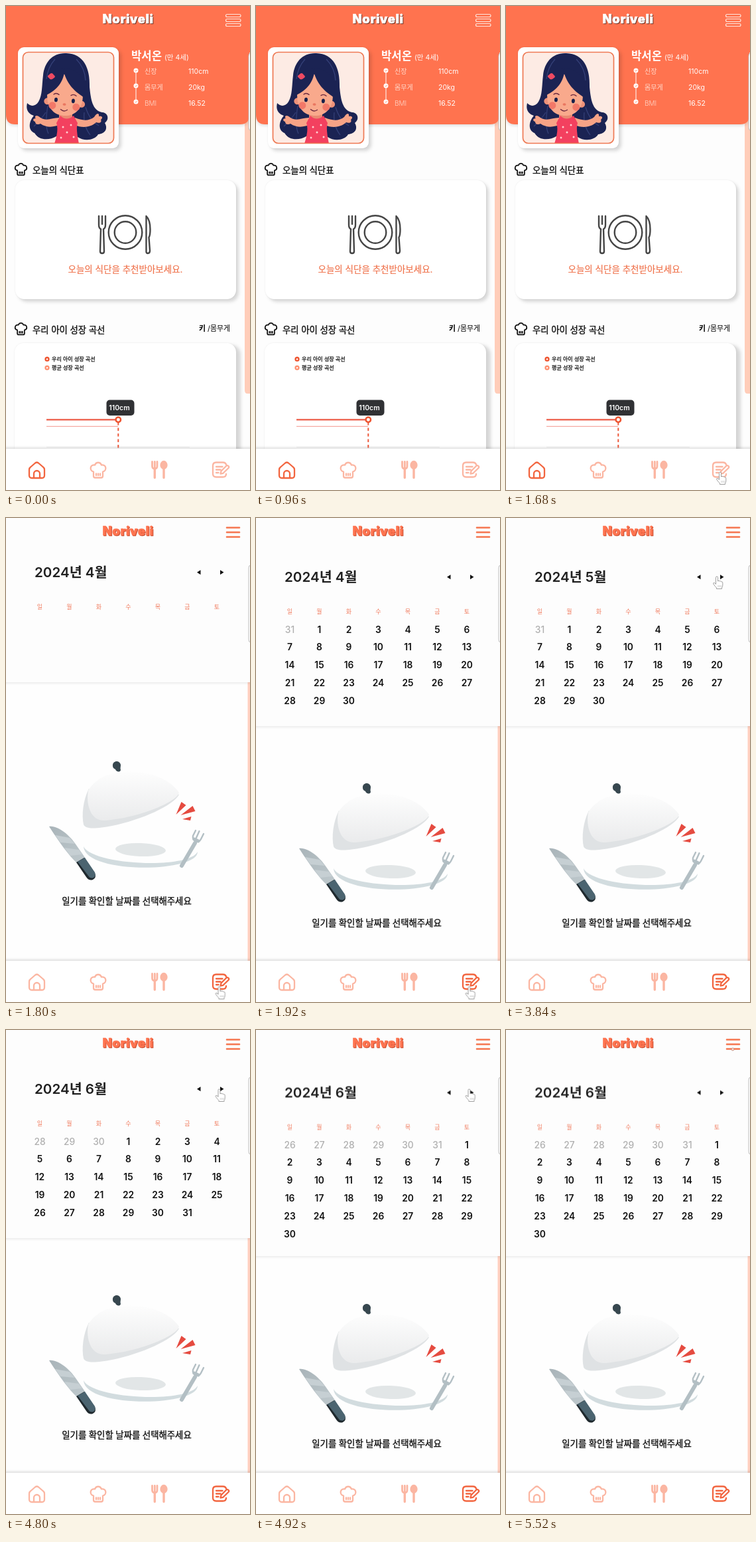
Recreate the animation shown at these times as an HTML page. Size 368 px wide and 728 px high, loop 5.64 s.

```html
<!DOCTYPE html>
<html lang="ko">
<head>
<meta charset="utf-8">
<title>Noriveli</title>
<style>
  html, body { margin: 0; width: 100%; height: 100%; overflow: hidden; background: #fdfdfd; }
  svg { display: block; }
  #stage { width: 368px; height: 728px; font-family: Inter, "Noto Sans CJK KR", "Noto Sans CJK", sans-serif; }
  .m { text-anchor: middle; }
  .title { font-size: 13.4px; }
  .medium { font-weight: 500; fill: #111; stroke: #111; stroke-width: .35; }
  .logo { font-size: 18.5px; font-weight: 900; letter-spacing: .5px; text-anchor: middle; stroke-width: .5; stroke-linejoin: round; }
  .row { font-size: 10.5px; fill: #fff; }
  .key { font-size: 10px; font-weight: 300; fill: #ffd9cc; }
  .legend { font-size: 8.05px; stroke-width: .25; }
  .month { font-size: 20.6px; font-weight: 600; fill: #202020; }
  .week { font-size: 9px; fill: #f07a5c; text-anchor: middle; }
  .day { font-size: 13.8px; font-weight: 600; text-anchor: middle; fill: #111; }
  .day.dim { fill: #b0b0b0; font-weight: 500; }
  .line { fill: none; stroke: currentColor; stroke-width: 2.3; stroke-linecap: round; stroke-linejoin: round; }
  .card { fill: #fff; filter: drop-shadow(4px 4px 2.5px rgba(0,0,0,.14)) drop-shadow(0 0 1px rgba(0,0,0,.08)); }
  .card.deep { filter: drop-shadow(7px 3px 2.5px rgba(0,0,0,.14)) drop-shadow(0 0 1px rgba(0,0,0,.08)); }
  .panel { fill: #fdfdfd; filter: drop-shadow(0 1px 2px rgba(0,0,0,.1)); }
  .bar { fill: #fff; filter: drop-shadow(0 -1px 2px rgba(0,0,0,.18)); }

  .a { animation: 5640ms step-end infinite; }
  #home { animation-name: home; }
  #diary { animation-name: diary; }
  #tabHome { animation-name: tabOff; }
  #tabDiary { animation-name: tabOn; }
  #head { animation-name: head; }
  #fold { animation-name: fold; }
  #art { animation-name: art; }
  #name4 { animation-name: name4; }
  #name5 { animation-name: name5; }
  #name6 { animation-name: name6; }
  #days4 { animation-name: days4; }
  #days5 { animation-name: days5; }
  #days6 { animation-name: days6; }
  #spot { animation-name: spot; }
  #hand { animation-name: hand; }

  @keyframes home { 0% { opacity: 1 } 31.915%, 100% { opacity: 0 } }
  @keyframes diary { 0% { opacity: 0 } 31.915%, 100% { opacity: 1 } }
  @keyframes tabOff { 0% { color: #f2653f } 31.915%, 100% { color: #fbb6a2 } }
  @keyframes tabOn { 0% { color: #fbb6a2 } 31.915%, 100% { color: #f2653f } }
  @keyframes head {
    0% { transform: translateY(-7px) } 34.043% { transform: none }
    87.234%, 100% { transform: translateY(5.5px) }
  }
  @keyframes fold {
    0% { transform: translateY(-66px) } 34.043% { transform: none }
    87.234%, 100% { transform: translateY(27px) }
  }
  @keyframes art {
    0% { transform: translateY(-33px) } 34.043% { transform: none }
    87.234%, 100% { transform: translateY(13px) }
  }
  @keyframes name4 { 0% { opacity: 1 } 68.085%, 100% { opacity: 0 } }
  @keyframes name5 { 0% { opacity: 0 } 68.085% { opacity: 1 } 85.106%, 100% { opacity: 0 } }
  @keyframes name6 { 0% { opacity: 0 } 85.106%, 100% { opacity: 1 } }
  @keyframes days4 { 0% { opacity: 0 } 34.043% { opacity: 1 } 70.213%, 100% { opacity: 0 } }
  @keyframes days5 { 0% { opacity: 0 } 70.213% { opacity: 1 } 87.234%, 100% { opacity: 0 } }
  @keyframes days6 { 0% { opacity: 0 } 87.234%, 100% { opacity: 1 } }
  @keyframes spot { 0% { opacity: 0 } 97.872%, 100% { opacity: 1 } }
  @keyframes hand {
    0% { transform: translate(-40px, -40px) }
    21.277% { transform: translate(357px, 716px) }
    23.404% { transform: translate(344px, 710px) }
    25.532% { transform: translate(332px, 705px) }
    27.66% { transform: translate(323px, 701px) }
    31.915% { transform: translate(321.5px, 705px) }
    36.17% { transform: translate(334px, 709px) }
    38.298% { transform: translate(351px, 714px) }
    40.426% { transform: translate(-40px, -40px) }
    61.702% { transform: translate(339px, 112px) }
    63.83% { transform: translate(328px, 99px) }
    65.957% { transform: translate(319px, 89px) }
    68.085% { transform: translate(318px, 88px) }
    72.34% { transform: translate(-40px, -40px) }
    82.979% { transform: translate(335px, 97px) }
    85.106% { transform: translate(321.5px, 89px) }
    89.362% { transform: translate(334px, 84px) }
    91.489%, 100% { transform: translate(-40px, -40px) }
  }
</style>
</head>
<body>
<svg id="stage" viewBox="0 0 368 728" width="368" height="728">
  <defs>
    <symbol id="hat" viewBox="0 0 26 26" overflow="visible">
      <path class="line" d="M6 15.5C-1 13.5 1 4 8 5.5C10 .5 16 .5 18 5.5C25 4 27 13.5 20 15.5V22Q20 24.5 17.5 24.5H8.5Q6 24.5 6 22ZM10 18.5v2.500M13 18.500v2.500M16 18.500v2.500"/>
    </symbol>
    <linearGradient id="dome" x1="0" y1="0" x2="0" y2="1">
      <stop offset="0" stop-color="#fdfdfd"/><stop offset="1" stop-color="#eaebec"/>
    </linearGradient>
    <linearGradient id="blade" x1="0" y1="0" x2="1" y2="1">
      <stop offset="0" stop-color="#a9b4b9"/><stop offset="1" stop-color="#bfc9cd"/>
    </linearGradient>
    <clipPath id="frame"><rect x="26" y="70" width="136" height="136" rx="7"/></clipPath>
  </defs>
  <rect width="368" height="728" fill="#fdfdfd"/>

  <g id="home" class="a">
    <path d="M360 160H368V583H364Q360 583 360 578Z" fill="#ffcdb9"/>
    <path d="M0 0H367V164Q367 178 353 178H14Q0 178 0 164Z" fill="#ff734f" style="filter:drop-shadow(0 2px 2px rgba(0,0,0,.12))"/>
    <path d="M366 0H368V70H366Z" fill="#ff734f"/>
    <text class="logo" x="185" y="27" fill="#6d3324" stroke="#6d3324">Noriveli</text>
    <text class="logo" x="184" y="26" fill="#fff" stroke="#fff">Noriveli</text>
    <g fill="#ff734f" stroke="#ffe3da" stroke-width="1.2">
      <rect x="331.5" y="12.5" width="22.5" height="4" rx="2"/>
      <rect x="331.5" y="19.5" width="22.5" height="4" rx="2"/>
      <rect x="331.5" y="26.5" width="22.5" height="4" rx="2"/>
    </g>

    <rect class="card" x="18" y="62" width="152" height="152" rx="9"/>
    <rect x="25.5" y="69.5" width="137" height="137" rx="8" fill="#fdebe4"/>
    <g clip-path="url(#frame)">
      <path d="M91 71C70 70 58 85 56 104C54 120 55 134 49 144C44 152 36 151 32 146C29 158 36 163 42 165C34 174 33 187 43 191C50 203 66 202 76 196L108 197C118 204 134 202 139 193C150 192 154 184 149 176C157 170 153 160 145 160C130 157 128 140 126 122C127 93 117 72 91 71Z" fill="#1b2353"/>
      <path d="M60 160Q52 172 42 181M120 152Q126 172 140 180M63 150Q58 180 64 192M118 160Q116 180 127 194M106 80Q119 93 120 112M74 80Q63 92 61 110" fill="none" stroke="#354179" stroke-width="1.2"/>
      <path d="M80 156H100V172H80Z" fill="#e98a72"/>
      <path d="M80 168C70 168 61 174 52 168C46 162 42 166 45 169C40 169 40 173 44 174C44 178 48 179 52 177C62 184 73 182 83 178ZM104 168C114 172 124 174 133 167C137 160 141 161 140 166C145 165 147 168 143 171C145 175 141 177 136 175C126 184 113 183 104 179Z" fill="#f7a386"/>
      <path d="M82 165Q91 174 102 165L108 176Q105 184 110 207H73Q80 186 76 176Z" fill="#f3405f"/>
      <g fill="#ffd0d2"><circle cx="86" cy="182" r="1.5"/><circle cx="98" cy="179" r="1.5"/><circle cx="92" cy="190" r="1.5"/><circle cx="83" cy="198" r="1.5"/><circle cx="102" cy="197" r="1.5"/></g>
      <g transform="translate(-3 4) rotate(4 92 130)">
        <circle cx="66" cy="141" r="5" fill="#ee927a"/><circle cx="118" cy="142" r="5" fill="#ee927a"/>
        <path d="M65 128C65 104 80 97 92 99C108 98 119 110 119 132C119 151 107 161 92 161C77 161 65 151 65 128Z" fill="#f9a98c"/>
        <path d="M89 90C89 111 79 123 64 132C60 108 68 88 89 90ZM86 90C93 114 106 123 120 131C124 106 112 88 86 90Z" fill="#1b2353"/>
        <g fill="#f27868"><circle cx="74" cy="147" r="5.5"/><circle cx="110" cy="147" r="5.5"/></g>
        <g fill="#18204a"><ellipse cx="79" cy="138" rx="2.5" ry="3.3"/><ellipse cx="105" cy="138" rx="2.5" ry="3.3"/></g>
        <path d="M75 130Q79 127 83 130M101 130Q105 127 109 130M87 152Q92 156 97 152" fill="none" stroke="#6d2b40" stroke-width="1.4" stroke-linecap="round"/>
        <ellipse cx="92" cy="144" rx="2.5" ry="1.8" fill="#e9765f"/>
        <path d="M66 101q4-5 7 0q4 2 0 5q-4 4-7 0q-4-2 0-5" fill="#ee4a62"/>
      </g>
    </g>
    <rect x="25.5" y="69.5" width="137" height="137" rx="8" fill="none" stroke="#ee7953" stroke-width="1.7"/>

    <g fill="#fff">
      <text x="189" y="81" font-size="16.7" font-weight="700">박서온</text>
      <text x="239" y="81" font-size="10.5">(만 4세)</text>
      <path d="M195.5 97h1v47h-1z"/>
      <circle cx="196" cy="97" r="3.5"/><circle cx="196" cy="120" r="3.5"/><circle cx="196" cy="144" r="3.5"/>
    </g>
    <path d="M194.5 97l1.2 1.2 2-2.2M194.5 120l1.2 1.2 2-2.2M194.5 144l1.2 1.2 2-2.2" fill="none" stroke="#ff734f" stroke-width=".8"/>
    <text class="key" x="209" y="102">신장</text><text class="row" x="275" y="102">110cm</text>
    <text class="key" x="209" y="126">몸무게</text><text class="row" x="275" y="126">20kg</text>
    <text class="key" x="209" y="150">BMI</text><text class="row" x="275" y="150">16.52</text>

    <use href="#hat" x="12.5" y="235.5" width="20" height="20" color="#111"/>
    <text class="title medium" x="40" y="252">오늘의 식단표</text>
    <rect class="card" x="14" y="262" width="333" height="179" rx="14"/>
    <g fill="none" stroke="#454545" stroke-width="2.4" stroke-linecap="round" stroke-linejoin="round">
      <circle cx="180" cy="340.5" r="25.3"/><circle cx="180" cy="340.5" r="16.3"/>
      <path d="M140 316V329Q140 334 143 335.5L142 369Q142 372 145 372T148 369L147 335.5Q150 334 150 329V316M145 316V328"/>
      <path d="M211.5 316Q217.5 322 217.5 336Q217.5 345 215.5 348L217 368Q217 372 214 372T211.5 368Z"/>
    </g>
    <text class="m" x="180" y="401" font-size="13.5" fill="#f0754f" stroke="#f0754f" stroke-width=".2">오늘의 식단을 추천받아보세요.</text>

    <use href="#hat" x="12.5" y="475.5" width="20" height="20" color="#111"/>
    <text class="title medium" x="40" y="492">우리 아이 성장 곡선</text>
    <text x="291" y="489" font-size="10.9"><tspan font-weight="700">키</tspan> /몸무게</text>
    <rect class="card deep" x="13" y="507" width="334" height="200" rx="14"/>
    <circle cx="62" cy="531.2" r="3.6" fill="#ee5430"/><circle cx="62" cy="544.2" r="3.6" fill="#ff8f70"/>
    <g fill="#fff"><circle cx="62" cy="531.2" r="1.2"/><circle cx="62" cy="544.2" r="1.2"/></g>
    <text class="legend medium" x="69" y="534">우리 아이 성장 곡선</text>
    <text class="legend medium" x="69" y="547">평균 성장 곡선</text>
    <path d="M61 663.5H277" stroke="#eee"/>
    <path d="M61 632.3H169" stroke="#f6aaa4" stroke-width="1.3"/>
    <path d="M61 622.3H169" stroke="#ee6b58" stroke-width="2.5"/>
    <path d="M169.3 626V666" stroke="#ee5a3c" stroke-width="2" stroke-dasharray="4.5 4"/>
    <circle cx="169.3" cy="622.3" r="3.7" fill="#fff" stroke="#ee5430" stroke-width="2.5"/>
    <rect x="151.5" y="592.5" width="42" height="23.5" rx="5" fill="#303134"/>
    <text class="m" x="171" y="608" font-size="10.5" font-weight="600" fill="#fff">110cm</text>
  </g>

  <g id="diary" class="a">
    <rect width="368" height="728" fill="#fefefe"/>
    <g id="fold" class="a">
      <rect x="364.5" y="313" width="4" height="480" fill="#ffd0c0"/>
      <rect class="panel" x="-4" y="-120" width="376" height="433"/>
    </g>
    <text class="logo" x="185" y="27" fill="#c9492b" stroke="#c9492b">Noriveli</text>
    <text class="logo" x="184" y="26" fill="#ff7450" stroke="#ff7450">Noriveli</text>
    <path d="M333 14.5H352M333 21.5H352M333 28.5H352" stroke="#f5764f" stroke-width="2.6" stroke-linecap="round"/>
    <g id="head" class="a">
      <text id="name4" class="month a" x="43" y="96">2024년 4월</text>
      <text id="name5" class="month a" x="43" y="96">2024년 5월</text>
      <text id="name6" class="month a" x="43" y="96">2024년 6월</text>
      <path d="M293.5 85.3V92.3L288 88.8ZM323 85.3V92.3L328.5 88.8Z" fill="#111"/>
      <g id="week"></g>
    </g>
    <g id="days4" class="a"></g>
    <g id="days5" class="a"></g>
    <g id="days6" class="a"></g>

    <g id="art" class="a">
      <path d="M117 527C119 569 289 567 289 535C275 562 130 555 117 527Z" fill="#d2dcdf"/>
      <ellipse cx="203" cy="532" rx="38" ry="10" fill="#e2e6e7" transform="rotate(2 203 532)"/>
      <path d="M125 440C116 458 114 480 117 494C120 502 138 500 160 496C205 487 253 465 261 449L250 446L150 470Z" fill="#dfe2e4"/>
      <path d="M124 443C134 426 153 416 180 415C214 413 246 424 261 446C259 459 205 483 150 488C129 490 120 466 124 443Z" fill="url(#dome)"/>
      <path d="M161 406C160 398 171 396 173 404C173 408 172 409 173 412C172 416 166 415 165 411C163 410 161 409 161 406Z" fill="#37474f"/>
      <path d="M264.5 460L271.5 465L256.5 479ZM281.5 466L285.5 474L263.5 480ZM266 486L279.5 482L278 488Z" fill="#e54b40"/>
      <path d="M65 497C78 495 96 510 106 525L120 545L107 552C95 541 82 523 65 497Z" fill="url(#blade)"/>
      <path d="M74 510L96 514L104 523L82 521ZM88 529L110 532L115 539L97 541Z" fill="#c6cfd3"/>
      <path d="M106 551L118 544L134 567Q137 574 131 577Q125 579 121 573Z" fill="#1f292e"/>
      <path d="M108 550L119 544L134 566Q136 571 132 574Q127 576 124 571Z" fill="#4b6470"/>
      <g fill="none" stroke="#b3bfc4" stroke-linecap="round" stroke-linejoin="round">
        <path d="M265 556L285 522" stroke-width="6"/>
        <path d="M286 503L282 511Q281 517 286 519Q291 522 294 516L298 508M291.5 504L287 514" stroke-width="2.4"/>
        <path d="M284 516L290 519" stroke-width="5"/>
      </g>
      <text class="m medium" x="182" y="614" font-size="13.4">일기를 확인할 날짜를 선택해주세요</text>
    </g>
    <circle id="spot" class="a" cx="342" cy="29" r="2" fill="#ffd9cc" stroke="#b98a7b" stroke-width=".8"/>
  </g>

  <path d="M369 71Q366 71 366 75V183Q366 187 369 187" fill="#fff" stroke="#bdbdbd"/>

  <rect class="bar" x="-4" y="666" width="376" height="70"/>
  <g color="#fbb6a2">
    <g id="tabHome" class="a">
      <path class="line" transform="translate(33.5 685)" d="M1.5 12.5Q1.5 10 3.5 8.5L10.5 2.5Q13 .5 15.5 2.5L22.5 8.5Q24.5 10 24.5 12.5V21Q24.5 25 20.5 25H5.5Q1.5 25 1.5 21ZM8.5 25V18.5a4.5 4.5 0 0 1 9 0V25"/>
    </g>
    <use href="#hat" x="126" y="685" width="26" height="26"/>
    <g class="line">
      <path d="M220.5 685.5V692Q220.5 696 224.3 696T228 692V685.5M224.3 685.5V696" stroke-width="2.8"/>
      <path d="M224.3 696V709.5M238 696V709.5" stroke-width="3.4"/>
      <ellipse cx="238" cy="690.5" rx="4.5" ry="5.5" fill="currentColor"/>
    </g>
    <g id="tabDiary" class="a">
      <path class="line" transform="translate(310.5 685)" d="M22 6Q21 1.5 16.5 1.5H6.5Q1.5 1.5 1.5 6.5V18.5Q1.5 23.5 6.5 23.5H16.5Q21.5 23.5 21.5 19M6.5 8H16M6.5 12.5H13M6.5 17H10M13 18.5L14 14.5L22 6.5Q23.5 5.5 25 7T25 10L17 17.8Z"/>
    </g>
  </g>

  <g id="hand" class="a">
    <path d="M-1.5 1.5Q-1.5 0 0 0T1.5 1.5V7Q3 5.5 4.3 7Q5.8 6.2 6.8 7.8Q8.6 7.5 8.8 9.5V13Q8.8 15 7.5 17V18.5H-.5V17Q-3 14.5-5.3 11Q-5.5 9-3.5 9.5L-1.5 11.5Z" fill="#fff" stroke="#888" stroke-width=".8" stroke-linejoin="round"/>
    <path d="M2 13v3M4.2 13v3M6.3 13v3" stroke="#aaa" stroke-width=".6"/>
  </g>
</svg>
<script>
  const NS = 'http://www.w3.org/2000/svg';
  const colX = i => 51 + (i % 7) * 44.5;

  function label(parent, text, x, y, cls) {
    const el = document.createElementNS(NS, 'text');
    el.setAttribute('x', x);
    el.setAttribute('y', y);
    el.setAttribute('class', cls);
    el.textContent = text;
    document.getElementById(parent).append(el);
  }

  // lead: days of the previous month shown before the 1st, ending on lastDay
  function fillMonth(id, lead, lastDay, length, top) {
    for (let i = 0; i < lead + length; i++) {
      const dim = i < lead;
      const day = dim ? lastDay - lead + i + 1 : i - lead + 1;
      label(id, day, colX(i), top + Math.floor(i / 7) * 26.8, dim ? 'day dim' : 'day');
    }
  }

  [...'일월화수목금토'].forEach((d, i) => label('week', d, colX(i), 143.5, 'week'));
  fillMonth('days4', 1, 31, 30, 172.6);
  fillMonth('days5', 3, 30, 31, 172.6);
  fillMonth('days6', 6, 31, 30, 177.6);
</script>
</body>
</html>
```
